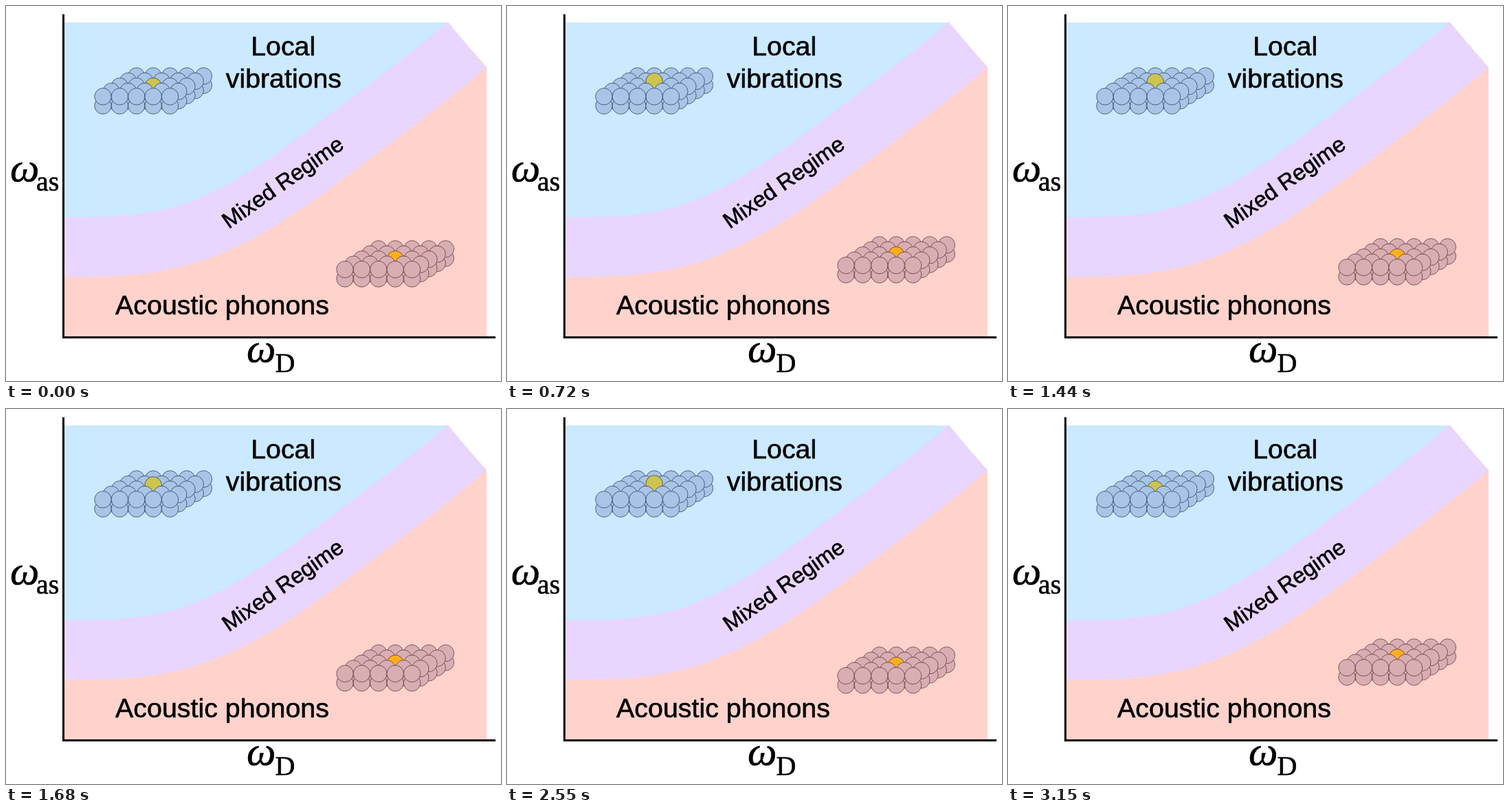
An HTML page with a canvas for the animation above (3.18 s loop, 720x546 px).

```html
<!DOCTYPE html>
<html lang="en">
<head>
<meta charset="utf-8">
<title>Vibration regimes</title>
<style>
  html, body { margin: 0; width: 720px; height: 546px; overflow: hidden; background: #fff; }
  canvas { display: block; }
</style>
</head>
<body>
<canvas id="stage" width="720" height="546"></canvas>
<script>
const ctx = document.getElementById('stage').getContext('2d');
const LOOP = 3180, HOLD = 450;
const SANS = '"Liberation Sans", Arial, sans-serif';
const SERIF = '"Liberation Serif", Times, serif';
const RADIUS = 12.2, COLUMN = 24.4, ROW_X = 12.2, ROW_Y = 7.45, LAYER = 13.4;
const BAND_WIDTH = 87;

// Centre line of the mixed band.
const bandLine = [[85, 351.3], [152, 350], [206, 345], [263, 332.5], [319, 310],
  [373, 280.3], [424.5, 246], [526, 170.7], [627, 92.7], [670.5, 56.5]];

const blueSlab = { x: 141, y: 131.8, fill: '#a8c4e6', line: '#1c2c48', core: '#cdc44e' };
const redSlab = { x: 493, y: 383.6, fill: '#d8aeb2', line: '#4a2226', core: '#ffaf1c' };

// Start time of each step: short and long steps alternate, with the order swapped mid-loop.
const starts = [0];
for (let t = HOLD, k = 1; t < LOOP; k++) {
  starts.push(t);
  const swapped = k >= 36 && k < 48;
  t += (k % 2 === 1) !== swapped ? 60 : 30;
}

function stepAt(time) {
  let k = starts.length - 1;
  while (starts[k] > time) k--;
  return k;
}

function smoothPath(points) {
  ctx.beginPath();
  ctx.moveTo(...points[0]);
  for (let i = 0; i < points.length - 1; i++) {
    const a = points[Math.max(i - 1, 0)], b = points[i], c = points[i + 1];
    const d = points[Math.min(i + 2, points.length - 1)];
    const m = (c[0] - b[0]) / 3;
    const slopeB = (c[1] - a[1]) / (c[0] - a[0]);
    const slopeC = (d[1] - b[1]) / (d[0] - b[0]);
    ctx.bezierCurveTo(b[0] + m, b[1] + m * slopeB, c[0] - m, c[1] - m * slopeC, c[0], c[1]);
  }
}

function region(corners, fill) {
  smoothPath(bandLine);
  corners.forEach(p => ctx.lineTo(...p));
  ctx.closePath();
  ctx.fillStyle = fill;
  ctx.fill();
}

function text(string, x, y, size, family, style = '') {
  ctx.font = `${style} ${size}px ${family}`;
  ctx.fillStyle = ctx.strokeStyle = '#000';
  ctx.lineWidth = 0.6;
  ctx.fillText(string, x, y);
  ctx.strokeText(string, x, y);
}

function symbol(subscript, x, y, subX, subY) {
  text('ω', x, y, 60, SERIF, 'italic');
  text(subscript, subX, subY, 40, SERIF);
}

function ball(x, y, fill, line) {
  ctx.beginPath();
  ctx.arc(x, y, RADIUS, 0, 2 * Math.PI);
  ctx.fillStyle = fill;
  ctx.fill();
  ctx.strokeStyle = line;
  ctx.lineWidth = 0.65;
  ctx.stroke();
}

function slab({ x, y, fill, line, core }, shift, coreShift) {
  for (const depth of [LAYER, 0]) {
    for (let row = 4; row >= 0; row--) {
      for (let col = 0; col < 5; col++) {
        const isCore = depth === 0 && row === 2 && col === 2;
        ball(x + col * COLUMN + row * ROW_X,
          y - row * ROW_Y + depth + shift + (isCore ? coreShift : 0),
          isCore ? core : fill, line);
      }
    }
  }
}

function drawDiagram() {
  ctx.fillStyle = '#fff';
  ctx.fillRect(0, 0, 720, 546);
  region([[642, 24], [85, 24]], '#cbe9ff');
  region([[699, 89], [699, 481], [85, 481]], '#ffd3cb');
  smoothPath(bandLine);
  ctx.strokeStyle = '#e9d6ff';
  ctx.lineWidth = BAND_WIDTH;
  ctx.stroke();

  ctx.fillStyle = '#000';
  ctx.fillRect(82, 12, 3, 472);
  ctx.fillRect(82, 481, 630, 3);

  text('Local', 356.2, 72, 39.3, SANS);
  text('vibrations', 319.8, 118.5, 39.3, SANS);
  text('Acoustic phonons', 159, 449, 39.4, SANS);
  ctx.save();
  ctx.translate(324, 325);
  ctx.rotate(-35 * Math.PI / 180);
  text('Mixed Regime', 0, 0, 32.4, SANS);
  ctx.restore();
  symbol('as', 6, 254.5, 44, 268.5);
  symbol('D', 350, 518, 391.5, 532.5);
}

function frame(now) {
  const step = stepAt(now % LOOP);
  const wave = (amplitude, period) => -amplitude * Math.sin(2 * Math.PI * step / period);
  drawDiagram();
  slab(blueSlab, 0, wave(8.7, 20.35));
  slab(redSlab, wave(8, 52.4), 0);
  requestAnimationFrame(frame);
}

frame(0);
</script>
</body>
</html>
```
